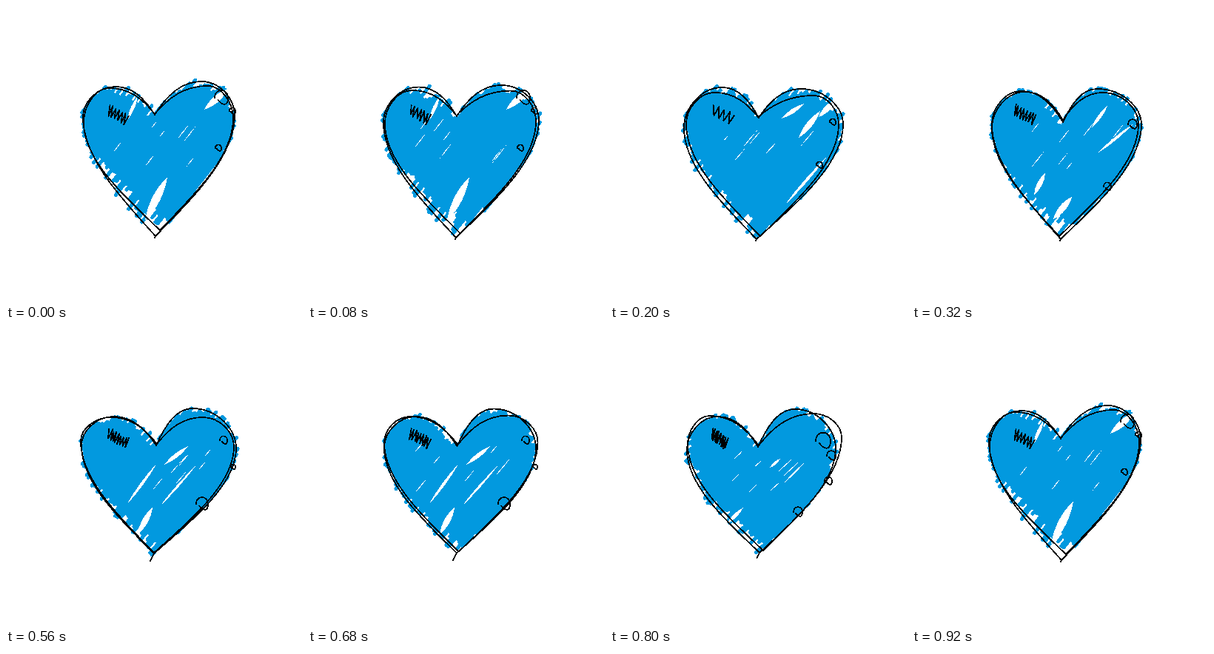
An HTML page for the animation above (960 ms loop, 400 by 400 pixels).

```html
<!DOCTYPE html>
<html lang="en">
<head>
<meta charset="utf-8">
<title>Scribbled heart</title>
<style>
  html, body { margin: 0; width: 100%; height: 100%; overflow: hidden; background: #fff; }
  svg { display: block; width: 100vw; height: 100vh; shape-rendering: crispEdges; }
  path { fill: none; stroke-linecap: round; stroke-linejoin: round; }
  .paint { stroke: #0299df; stroke-width: 5; }
  .bare { fill: #fff; }
  .ink { stroke: #000; stroke-width: 1.8; }
</style>
</head>
<body>
<svg id="stage" viewBox="0 0 400 400"></svg>
<script>
const LOOP = 960;
const SPACING = 3.6;
const stage = document.getElementById('stage');

// loops: cleft, left top, left side, tip, right side, right top of each pen line.
// low, high: how far strokes may stop short of the edge, at the first and last stroke.
// bare: slivers left white, as x1, y1, x2, y2, width.
// curls: x, y, radius. hatch: number of turns, width.
const tilted = {
  seed: 11, angle: 52, low: [2, 32], high: [20, 8], tail: 2, hatch: [13, 26],
  loops: ['201,147 148,109 104,150 202,311 309,148 264,102', '201,146 140,111 105,158 208,303 307,152 272,108'],
  bare: [[188, 290, 218, 231, 11], [164, 154, 178, 122, 5], [268, 140, 300, 112, 9]],
  curls: [[291, 124, 9], [306, 142, 4], [287, 192, 4]]
};
const wide = {
  seed: 23, angle: 50, low: [12, 20], high: [14, 14], tail: 2, hatch: [9, 28],
  loops: ['201,151 152,110 100,165 198,315 315,160 258,112', '200,150 142,117 103,160 203,311 309,160 275,121'],
  bare: [[237, 268, 292, 205, 4], [255, 178, 284, 142, 8], [232, 152, 262, 132, 6], [282, 150, 306, 126, 8]],
  curls: [[301, 157, 4], [283, 215, 4]]
};
const leaning = {
  seed: 37, angle: 52, low: [0, 28], high: [10, 14], tail: 2, hatch: [15, 28],
  loops: ['204,157 148,115 108,160 201,315 310,160 250,112', '204,154 153,116 108,165 199,311 306,160 258,117'],
  bare: [[191, 288, 216, 258, 9], [165, 255, 180, 226, 7], [243, 164, 264, 135, 5], [252, 198, 298, 160, 4]],
  curls: [[298, 160, 6], [264, 244, 5]]
};
const narrow = {
  seed: 41, angle: 50, low: [4, 18], high: [12, 8], tail: 10, hatch: [17, 26],
  loops: ['203,156 146,117 102,156 200,302 311,160 252,106', '204,154 142,118 101,150 200,301 308,158 266,118'],
  bare: [[163, 236, 204, 180, 4], [178, 276, 198, 240, 8], [214, 182, 246, 157, 6], [208, 238, 256, 184, 3]],
  curls: [[294, 149, 5], [265, 235, 8], [307, 185, 3]]
};
const dense = {
  seed: 59, angle: 43, low: [14, 16], high: [6, 12], tail: 7, hatch: [20, 20],
  loops: ['200,158 146,117 104,162 202,301 305,160 250,107', '201,156 135,116 105,155 207,298 313,145 275,113'],
  bare: [[216, 186, 230, 174, 4], [158, 262, 180, 240, 5], [236, 206, 262, 180, 2]],
  curls: [[288, 150, 10], [299, 170, 6], [254, 246, 6], [295, 204, 5]]
};

const parse = text => text.split(' ').map(pair => pair.split(',').map(Number));
const mix = (a, b, t) => a + (b - a) * t;
const mixPoint = (p, q, tx, ty = tx) => [mix(p[0], q[0], tx), mix(p[1], q[1], ty)];

function seeded(seed) {
  return () => {
    seed = (seed * 16807) % 2147483647;
    return seed / 2147483647;
  };
}

function between(a, b) {
  const loops = a.loops.map((loop, i) => {
    const other = parse(b.loops[i]);
    return parse(loop).map((p, k) => mixPoint(p, other[k], .5)).join(' ');
  });
  return { ...a, loops, seed: a.seed * b.seed };
}

// One half of the heart: flat at the top, upright at the side, straight into the tip.
function half(cleft, top, side, tip) {
  return [
    [cleft, mixPoint(cleft, top, .25, .55), mixPoint(top, cleft, .45, 0), top],
    [top, mixPoint(top, side, .55, 0), mixPoint(side, top, 0, .5), side],
    [side, mixPoint(side, tip, 0, .36), mixPoint(tip, side, .41, .28), tip]
  ];
}

function halves(loop) {
  const [cleft, leftTop, leftSide, tip, rightSide, rightTop] = parse(loop);
  return [half(cleft, leftTop, leftSide, tip), half(cleft, rightTop, rightSide, tip)];
}

const penLine = curves => curves.map(([a, b, c, d]) => `M${a}C${b} ${c} ${d}`).join('');

function bezierPoint([a, b, c, d], t) {
  const ab = mixPoint(a, b, t), bc = mixPoint(b, c, t), cd = mixPoint(c, d, t);
  return mixPoint(mixPoint(ab, bc, t), mixPoint(bc, cd, t), t);
}

function outline(loop) {
  const trace = curves => curves.flatMap(c => Array.from({ length: 16 }, (_, i) => bezierPoint(c, i / 16)));
  const [left, right] = halves(loop).map(trace);
  return [...left, parse(loop)[3], ...right.reverse()];
}

// Parallel strokes across the heart, each ending a little off the edge.
function scribble(pose, random) {
  const angle = pose.angle * Math.PI / 180;
  const cos = Math.cos(angle), sin = Math.sin(angle);
  const points = outline(pose.loops[0]).map(([x, y]) => [x * cos - y * sin, x * sin + y * cos]);
  const across = points.map(p => p[1]);
  const first = Math.min(...across) + 3, last = Math.max(...across) - 2;
  const toStage = (u, v) => [u * cos + v * sin, v * cos - u * sin];
  let d = '';
  for (let v = first; v < last; v += SPACING) {
    const t = (v - first) / (last - first);
    const crossings = points.flatMap((p, i) => {
      const q = points[(i + 1) % points.length];
      return (p[1] > v) === (q[1] > v) ? [] : [mix(p[0], q[0], (v - p[1]) / (q[1] - p[1]))];
    }).sort((a, b) => a - b);
    for (let i = 0; i + 1 < crossings.length; i += 2) {
      const start = crossings[i] + mix(-4, mix(...pose.low, t), random());
      const end = crossings[i + 1] - mix(-4, mix(...pose.high, t), random());
      if (end > start) d += `M${toStage(start, v)}L${toStage(end, v)}`;
    }
  }
  return d;
}

function sliver([x1, y1, x2, y2, width]) {
  const length = Math.hypot(x2 - x1, y2 - y1);
  const nx = (y2 - y1) / length * width, ny = (x1 - x2) / length * width;
  const [mx, my] = [(x1 + x2) / 2, (y1 + y2) / 2];
  return `M${x1},${y1}Q${mx + nx},${my + ny} ${x2},${y2}Q${mx - nx},${my - ny} ${x1},${y1}Z`;
}

function thinSlivers(pose, random) {
  const angle = pose.angle * Math.PI / 180;
  return Array.from({ length: 7 }, () => {
    const x = mix(140, 270, random()), y = mix(165, 225, random()), length = mix(12, 34, random());
    return sliver([x, y, x + length * Math.cos(angle), y - length * Math.sin(angle), 1.3]);
  }).join('');
}

function hatch([turns, width], random) {
  const points = Array.from({ length: turns }, (_, i) => {
    const t = i / (turns - 1), side = i % 2 ? 1 : -1;
    return [137 + width * t - 2 * side + 2 * random(), 140 + 14 * t + side * mix(5, 8, random())];
  });
  return `M${points.join('L')}`;
}

const curl = ([x, y, r]) =>
  `M${x - r},${y}c0,${-1.5 * r} ${2 * r},${-1.5 * r} ${2 * r},0s${-r},${r} ${-1.5 * r},${.3 * r}`;

function add(parent, name, attributes) {
  const node = document.createElementNS('http://www.w3.org/2000/svg', name);
  for (const key in attributes) node.setAttribute(key, attributes[key]);
  return parent.appendChild(node);
}

function draw(pose) {
  const random = seeded(pose.seed);
  const group = add(stage, 'g', { opacity: 0 });
  const layer = (name, d) => add(group, 'path', { class: name, d });
  const tip = parse(pose.loops[0])[3];
  layer('paint', scribble(pose, random));
  layer('bare', pose.bare.map(sliver).join('') + thinSlivers(pose, random));
  layer('ink', pose.loops.flatMap(halves).map(penLine).join('')
    + pose.curls.map(curl).join('')
    + `M${tip}l${-pose.tail / 2},${pose.tail}`
    + hatch(pose.hatch, random));
  return group;
}

const steps = [
  [0, tilted], [80, between(tilted, wide)], [200, wide], [320, leaning],
  [440, between(leaning, narrow)], [560, narrow], [680, between(narrow, dense)],
  [800, dense], [920, tilted]
];

steps.forEach(([start, pose], i) => {
  const end = i + 1 < steps.length ? steps[i + 1][0] : LOOP;
  const key = (opacity, time) => ({ opacity, offset: time / LOOP, easing: 'step-end' });
  draw(pose).animate([key(0, 0), key(1, start), key(0, end), key(0, LOOP)],
    { duration: LOOP, iterations: Infinity });
});
</script>
</body>
</html>
```
